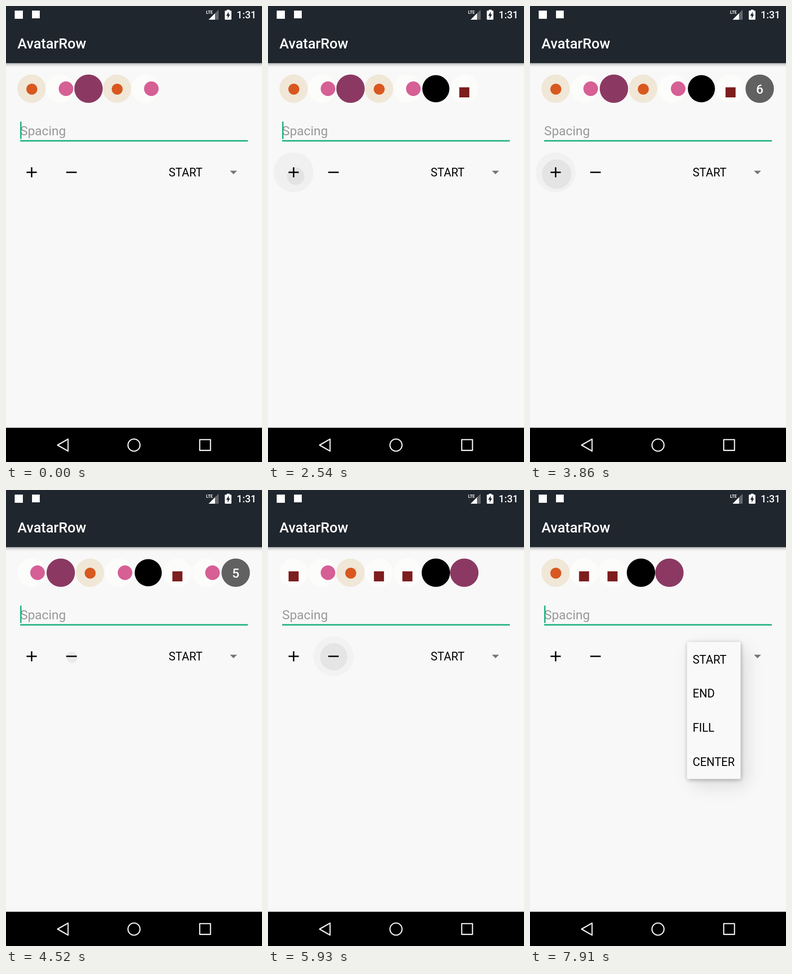
These frames come from a looping animation (561x998 px, 8 s). An HTML page with a canvas:

```html
<!DOCTYPE html>
<html lang="en">
<head>
<meta charset="utf-8">
<title>Avatar row</title>
<style>
  html, body { margin: 0; width: 100%; height: 100%; overflow: hidden; background: #f8f8f8; }
  canvas { display: block; width: 561px; height: 998px; }
</style>
</head>
<body>
<canvas id="stage" width="561" height="998"></canvas>
<script>
const ctx = document.getElementById('stage').getContext('2d');
const W = 561, H = 998, LOOP = 8000;
const PAPER = '#f8f8f8', BAR = '#20262e', ACCENT = '#1fb282';

// One letter per avatar, in the order in which they join the row.
const AVATARS = 'BMPBMKLMBLLWP';
const START_COUNT = 5, MAX_SLOTS = 8;
const ADDS = [2070, 2320, 2570, 2820, 3030, 3300, 3540, 3780];
const REMOVES = [4520, 4730, 4920, 5110, 5460, 5780, 6060, 6350];
const BLINKS = [470, 940, 1410, 2280, 2770, 3270, 3760, 4240, 4740, 5240, 5740, 6210, 6780, 7150];
const SPINNER_TAP = 7440, MENU_OPEN = 7500;

const clamp = v => Math.min(1, Math.max(0, v));
const ramp = (t, from, to) => clamp((t - from) / (to - from));
const easeOut = p => 1 - (1 - p) ** 3;
const passed = (times, t) => times.filter(x => x <= t).length;

function rect(x, y, w, h, color) {
  ctx.fillStyle = color;
  ctx.fillRect(x, y, w, h);
}

function disc(x, y, r, color) {
  ctx.fillStyle = color;
  ctx.beginPath();
  ctx.arc(x, y, r, 0, Math.PI * 2);
  ctx.fill();
}

function roundBox(x, y, w, h, r, color) {
  ctx.fillStyle = color;
  ctx.beginPath();
  ctx.roundRect(x, y, w, h, r);
  ctx.fill();
}

function polygon(points, color) {
  ctx.fillStyle = color;
  ctx.beginPath();
  points.forEach(([x, y]) => ctx.lineTo(x, y));
  ctx.closePath();
  ctx.fill();
}

function text(str, x, y, size, color, weight = 400, align = 'left') {
  ctx.font = `${weight} ${size}px Roboto, sans-serif`;
  ctx.textAlign = align;
  ctx.fillStyle = color;
  ctx.fillText(str, x, y);
}

function drawBars() {
  ctx.save();
  ctx.shadowColor = 'rgba(0,0,0,.4)';
  ctx.shadowBlur = 7;
  ctx.shadowOffsetY = 2;
  rect(-10, 0, W + 20, 125, BAR);
  ctx.restore();
  text('AvatarRow', 25, 93, 31.2, '#fff', 500);

  rect(19, 10, 18, 18, '#fff');
  rect(57, 10, 17, 17, '#fff');
  text('LTE', 438.5, 17, 9, '#fff', 700);
  polygon([[466, 8], [466, 30], [444, 30]], '#62676c');
  polygon([[458, 16], [458, 30], [444, 30]], '#fff');
  rect(484, 8, 6, 4, '#fff');
  roundBox(479.5, 10, 14.5, 20, 1.5, '#fff');
  polygon([[488, 12.5], [482.5, 21.5], [486, 21.5], [485.5, 27.5], [491, 18.5], [488, 18.5]], BAR);
  text('1:31', 505.5, 27, 21.8, '#fff', 500);

  rect(0, 923, W, H - 923, '#000');
  ctx.strokeStyle = '#eee';
  ctx.lineWidth = 2.6;
  ctx.lineJoin = 'round';
  ctx.beginPath();
  ctx.moveTo(113, 961);
  ctx.lineTo(136, 947.8);
  ctx.lineTo(136, 974.2);
  ctx.closePath();
  ctx.stroke();
  ctx.beginPath();
  ctx.arc(280.5, 961, 13.2, 0, Math.PI * 2);
  ctx.stroke();
  ctx.strokeRect(424.5, 949, 23.6, 23.6);
}

function drawAvatar(kind, x) {
  const y = 181;
  const backs = { B: '#f0e7d7', P: '#8b3963', K: '#000', W: '#000' };
  disc(x, y, kind === 'K' ? 29.7 : 31.1, backs[kind] || '#fcfcfa');
  if (kind === 'B') disc(x + 0.5, y + 1, 12, '#d8581f');
  if (kind === 'M') disc(x + 13, y, 16, '#d65f95');
  if (kind === 'L') rect(x - 11, y - 3, 22, 22, '#7d1d1d');
}

function drawRow(t) {
  const removed = passed(REMOVES, t);
  const count = START_COUNT + passed(ADDS, t) - removed;
  const overflow = count > MAX_SLOTS;
  const pitch = count >= MAX_SLOTS ? 63.9 : 62.35;
  const shown = overflow ? MAX_SLOTS - 1 : count;
  for (let i = 0; i < shown; i++) drawAvatar(AVATARS[removed + i], 56.1 + i * pitch);
  if (overflow) {
    disc(503.4, 181, 31.1, '#616161');
    text(String(count - shown), 503.4, 191.5, 28, '#fff', 500, 'center');
  }
}

// A press makes a disc that grows from the finger towards the button's centre, over a faint halo.
function drawRipples(t, presses, x, y, dx, dy) {
  const ages = presses.map(p => t - p).filter(a => a >= 0 && a < 520);
  const halo = Math.max(0, ...ages.map(a => ramp(a, 0, 200) * (1 - ramp(a, 320, 520))));
  disc(x, y, 43.8, `rgba(0,0,0,${halo * 0.03})`);
  for (const age of ages) {
    const r = Math.min(44, 12 + age * 0.118), rest = 1 - r / 44;
    const alpha = 0.055 * (1 - ramp(age, 180, 260));
    disc(x + dx * rest, y + dy * rest, r, `rgba(0,0,0,${alpha})`);
  }
}

function drawControls(t) {
  text('Spacing', 31, 283, 28, '#999');
  rect(31, 293.5, 499, 3.2, ACCENT);
  if (passed(BLINKS, t) % 2 === 0) rect(31, 253, 3, 38, ACCENT);

  drawRipples(t, ADDS.map(c => c - 90), 56, 364, 8.5, 15);
  drawRipples(t, REMOVES, 143.5, 364, 1.5, 3);
  rect(45, 362.5, 22.5, 3, '#000');
  rect(54.7, 353, 3, 22, '#000');
  rect(132, 362.5, 23, 3, '#000');

  text('START', 356.5, 373, 24.9, '#000');
  const age = t - SPINNER_TAP;
  if (age >= 0 && age < 420) {
    disc(498.5, 364, 12 + 19 * ramp(age, 0, 200), `rgba(0,0,0,${0.05 * (1 - ramp(age, 180, 420))})`);
  }
  polygon([[490.7, 360.5], [506.3, 360.5], [498.5, 368.3]], '#757575');
}

function drawMenu(t) {
  if (t < MENU_OPEN) return;
  const open = easeOut(ramp(t, MENU_OPEN, 7870));
  const height = 75 + 225 * open;
  ctx.save();
  ctx.globalAlpha = ramp(t, MENU_OPEN - 60, MENU_OPEN + 140);
  ctx.shadowColor = 'rgba(0,0,0,.12)';
  ctx.shadowBlur = 40;
  ctx.shadowOffsetX = 12;
  ctx.shadowOffsetY = 14;
  roundBox(344, 332.5, 117.5, height, 3, PAPER);
  ctx.shadowColor = 'rgba(0,0,0,.3)';
  ctx.shadowBlur = 9;
  ctx.shadowOffsetX = 1;
  ctx.shadowOffsetY = 2;
  roundBox(344, 332.5, 117.5, height, 3, '#f9f9f9');
  ctx.shadowColor = 'transparent';
  ctx.beginPath();
  ctx.rect(344, 332.5, 117.5, height);
  ctx.clip();
  ['START', 'END', 'FILL', 'CENTER'].forEach((label, i) =>
    text(label, 356.5, 379.5 + i * 74.8, 24.9, '#000'));
  ctx.restore();
}

function frame(now) {
  const t = now % LOOP;
  rect(0, 0, W, H, PAPER);
  drawBars();
  drawRow(t);
  drawControls(t);
  drawMenu(t);
  requestAnimationFrame(frame);
}
requestAnimationFrame(frame);
</script>
</body>
</html>
```
